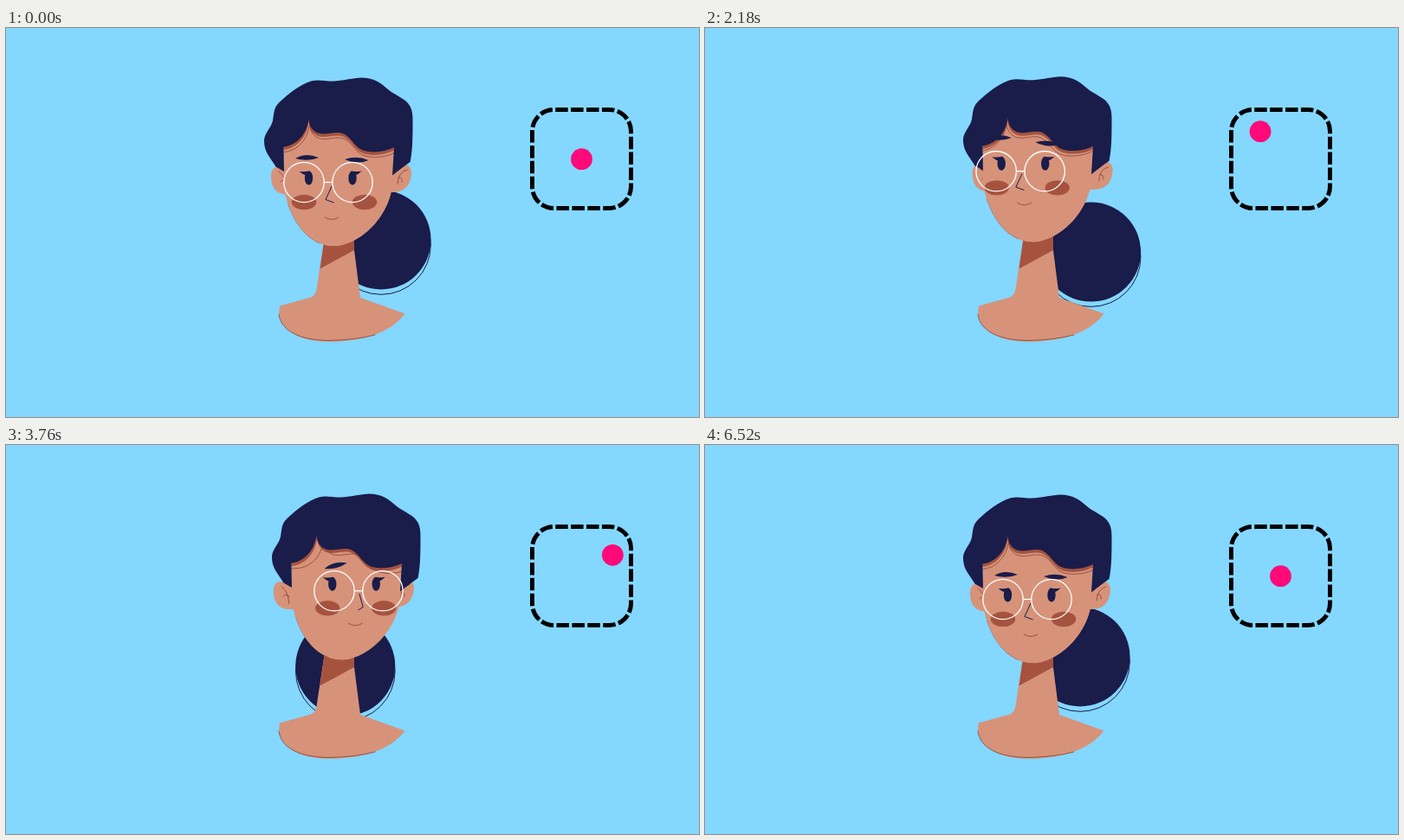
Write an HTML page without scripts that moves like this. It is 800 px wide and 450 px high and loops after 6.56 s.

```html
<!DOCTYPE html>
<html lang="en">
<head>
<meta charset="utf-8">
<title>Head turn</title>
<style>
@property --x { syntax: "<number>"; inherits: true; initial-value: 0; }
@property --y { syntax: "<number>"; inherits: true; initial-value: 0; }

html, body { margin: 0; width: 100%; height: 100%; overflow: hidden; background: #84d7ff; }
svg { display: block; width: 100vw; height: 100vh; animation: steer 6560ms cubic-bezier(.45, 0, .55, 1) infinite; }

/* The dot's offset from its centre drives every layer. */
@keyframes steer {
  0%, 91.463%, 100% { --x: 0; --y: 0; }
  15.244% { --x: 54.5; --y: -7.5; }
  30.488% { --x: -27.7; --y: -35.5; }
  45.732% { --x: 42.8; --y: 21.5; }
  60.976% { --x: 35; --y: -30; }
  76.22% { --x: -51; --y: -1.5; }
}

/* Gains: --r right, --l left, --d down, --u up */
.m {
  --tx: calc(1px * (max(var(--x), 0) * var(--r) + min(var(--x), 0) * var(--l)));
  --ty: calc(1px * (max(var(--y), 0) * var(--d) + min(var(--y), 0) * var(--u)));
  transform: translate(var(--tx), var(--ty));
}
.dot { --r: 1; --l: 1; --d: 1; --u: 1; }
.bun { --r: -1.15; --l: -.54; --d: -.71; --u: -.44; }
.ears { --r: .08; --l: -.115; --d: .33; --u: .1; }
.face { --r: .25; --l: 0; --d: .33; --u: .15; }
.shade { --r: .02; --l: 0; --d: .25; --u: -.11; }
.strand { --r: .2; --l: .1; --d: .25; --u: -.11; }
.cheek { --r: .51; --l: .31; --d: .33; --u: .37; }
.far { --r: .37; }
.features { --r: .76; --l: .31; --d: .64; --u: .52; }
.nose { --r: .89; --l: .43; --d: .8; --u: .45; }
.brow { --r: .92; --l: .3; --d: .84; --u: .6; }
.brow.far { --r: .86; --l: .41; }
.hair { --r: .25; --l: 0; --d: .58; --u: .04; }
.glasses { --r: .975; --l: .333; --d: .9; --u: .4; }

.tilt { transform-box: fill-box; transform-origin: center; }
.brow .tilt {
  transform: translateY(calc(1px * (max(var(--x), 0) * .11 + min(var(--x), 0) * .16)))
    rotate(calc(-.35deg * max(var(--x), 0)));
}
.brow.far .tilt {
  transform: translateY(calc(-.19px * max(var(--x), 0)))
    rotate(calc(.28deg * max(var(--x), 0) - .14deg * min(var(--x), 0)));
}
.flip { transform: scaleX(calc(1 - max(var(--x), 0) * .045)); }

.skin { fill: #d6937a; }
.navy { fill: #1a1c4a; }
.rust { fill: #a5533f; }
.line { fill: none; stroke: #8a4234; stroke-width: .8; stroke-linecap: round; }
.ink { fill: none; stroke: #1a1c4a; stroke-width: 1; }
</style>
</head>
<body>
<svg viewBox="0 0 800 450">
  <defs>
    <path id="hair" d="M298 130C298.500 121 306 116 308 107C309.500 98 309 92 316 85.500C326 76 340 65 352 61.500C361 59 369 62 379 61.500C391 60.500 400 58 410 57.500C426 57.500 433 64 441 71C448 77 459 81 464 87C468 92 469.500 97 469.500 106C469.500 125 469.500 142 466.500 155Q458 161 446 170.500L448 138C437 144 420 145 411 141C402 137 399 127 390 122.500C380 118 370 125 360 121.500C352 118 350 112 349.500 105C348 119 339 135 320.500 137.500L321 166L311.500 160.500C303 147 298 143 298 130Z"/>
    <path id="fringe" d="M290 90V139L320.500 137.500C339 135 348 119 349.500 105C350 112 352 118 360 121.500C370 125 380 118 390 122.500C399 127 402 137 411 141C420 145 437 144 448 138L470 130V90"/>
    <path id="face" d="M320.500 118V180C322 206 341 252.500 379 252.500C406 252.500 447 219 447 172L449 120L410 98H340Z"/>
    <clipPath id="in-face"><use href="#face"/></clipPath>
  </defs>

  <rect width="800" height="450" fill="#84d7ff"/>

  <g class="m bun">
    <circle class="navy" cx="433" cy="245" r="57.500"/>
    <circle class="ink" cx="433" cy="251" r="57.300"/>
  </g>

  <path class="skin" d="M368 240L358.500 302Q357 310 352 311.500L316 321.500Q312 340 328 351C340 360 358 363 376 363C412 362 444 353 460.500 330.500L409 312L402 257V240Z"/>
  <path class="rust" d="M368 240H402V257L362.500 278.500Z"/>
  <path class="line" d="M315 331C317 350 338 361 372 361.500Q404 361 426 355"/>

  <g class="m ears">
    <path class="skin" d="M332 161H316C308 159 305.500 166 306 174C307 186 313 192 323 192.500H332Z"/>
    <path class="line" d="M315 166Q323 171 324 186M317 178Q321 173 324 178"/>
    <path class="skin" d="M438 160Q452 156 462 158C470 161 469 171 465 180C461 188 453 191 438 190Z"/>
    <path class="line" d="M452 180Q453 166 463 164M453 173Q458 172 457 178"/>
  </g>

  <g class="m face" clip-path="url(#in-face)">
    <use class="skin" href="#face"/>
    <g class="m shade"><use class="rust" href="#fringe" y="3.500"/></g>
    <g class="m strand"><use class="line" href="#fringe" x="1" y="6"/></g>
    <ellipse class="m cheek rust" cx="344" cy="201.500" rx="14.200" ry="8.700"/>
    <ellipse class="m cheek far rust" cx="414" cy="201.500" rx="14.200" ry="8.700"/>
    <path class="line" d="M325 203C332 224 344 242 362 249"/>
  </g>

  <g class="m brow navy"><path class="tilt" d="M334 151Q346 143.500 361 150Q348 155 334 151Z"/></g>
  <g class="m brow far navy"><path class="tilt" d="M391 152Q405 147 418.500 153Q405 158.500 391 152Z"/></g>

  <g class="m features">
    <g class="navy">
      <ellipse cx="349.500" cy="173.500" rx="4.700" ry="8"/>
      <path d="M338.500 166Q345 166.500 351 165.500L348 171Q343 170 338.500 166Z"/>
      <ellipse cx="400" cy="173.500" rx="4.700" ry="8"/>
      <path d="M410.500 165.500Q404 166.500 398 165.500L401 171Q406 170 410.500 165.500Z"/>
    </g>
    <path class="line" d="M368 219Q376 224 384 219"/>
  </g>

  <g class="m nose">
    <g transform="translate(376 183)">
      <path class="ink flip" vector-effect="non-scaling-stroke" d="M0 0L-7 15.500L2.500 19"/>
    </g>
  </g>

  <g class="m hair"><use class="navy" href="#hair"/></g>

  <g class="m glasses" fill="none" stroke="#fff" stroke-width="1.300">
    <circle cx="344" cy="178.500" r="23.200"/>
    <circle cx="400" cy="178.500" r="23.200"/>
    <path d="M367.200 178.500H376.800"/>
  </g>

  <rect x="607.500" y="94.500" width="114" height="114" rx="25" fill="none" stroke="#000" stroke-width="5"
    pathLength="23" stroke-dasharray=".81 .19" stroke-dashoffset="-.095"/>
  <circle class="m dot" cx="664.500" cy="151.700" r="12.400" fill="#ff0a78"/>
</svg>
</body>
</html>
```
